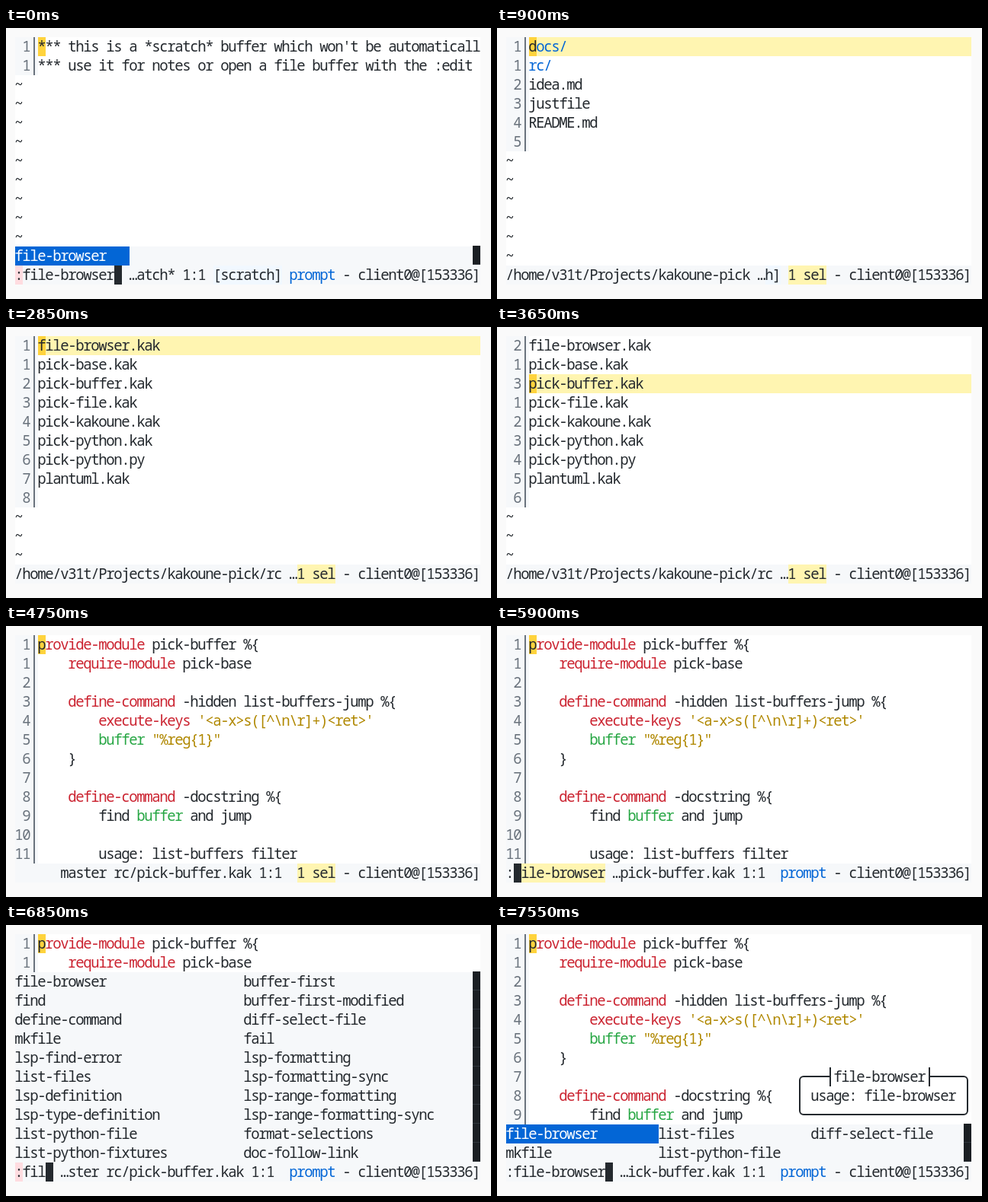
An HTML page that plays this animation: 636 px wide and 356 px high, repeating every 8000 ms.

```html
<!DOCTYPE html>
<html lang="en">
<head>
<meta charset="utf-8">
<title>Terminal file browser</title>
<style>
  html, body { margin: 0; width: 100%; height: 100%; overflow: hidden; background: #fafafa; }
  #screen {
    position: absolute; left: 12px; top: 12px; width: 610px; height: 325px;
    background: #fff; color: #24292e;
    font: 500 19px/25px "Noto Sans Mono", "DejaVu Sans Mono", monospace;
    font-stretch: 75%; font-variant-ligatures: none;
    letter-spacing: calc(10px - .6em);
  }
  #screen span {
    position: absolute; height: 25px; white-space: pre; text-indent: calc(5px - .3em);
  }
  #screen i { position: absolute; box-sizing: border-box; }
  .bar { background: #f6f8fa; }
  .gutter { background: #f6f8fa; color: #6a737d; }
  .line { background: #fff5b1; }
  .lineDir { background: #fff5b1; color: #0366d6; }
  .cursor { background: #ffd33d; }
  .dir { color: #0366d6; }
  .key { color: #cb2431; }
  .cmd { color: #28a745; }
  .str { color: #b08800; }
  .mode { background: #f6f8fa; color: #0366d6; }
  .sel { background: #fff5b1; }
  .note { background: #f1f8ff; }
  .bad { background: #ffdce0; }
  .block { background: #24292e; }
  .pick { background: #0366d6; color: #fff; }
  .thumb { background: #1b1f23; box-shadow: inset 0 -1px #2f363d; transform: translateY(-1px); }
  .track { background: #bfc1c4; }
  .rule { width: 2px; background: #6a737d; }
  .frame { border: 2px solid #24292e; border-radius: 6px; }
  .title { border: solid #24292e; border-width: 0 2px; background: #fff; }
</style>
</head>
<body>
<div id="screen"></div>
<script>
const COLS = 61, ROWS = 13, CW = 10, CH = 25, LOOP = 8000;
const screen = document.getElementById('screen');
let cells, shapes;

function put(row, col, text, cls = '') {
  [...text].forEach((ch, i) => {
    if (col + i < COLS) cells[row][col + i] = [ch, cls];
  });
}

function shape(cls, x, y, w, h) {
  shapes.push(`<i class="${cls}" style="left:${x}px;top:${y}px;width:${w}px;height:${h}px"></i>`);
}

const escapeHtml = s => s.replace(/&/g, '&amp;').replace(/</g, '&lt;');

function runs(row, y) {
  let html = '';
  for (let start = 0; start < COLS;) {
    const cls = row[start][1];
    let end = start, text = '';
    while (end < COLS && row[end][1] === cls) text += row[end++][0];
    if (cls || text.trim()) {
      html += `<span class="${cls}" style="left:${start * CW}px;top:${y * CH}px;` +
        `width:${(end - start) * CW}px">${escapeHtml(text)}</span>`;
    }
    start = end;
  }
  return html;
}

// Text window: relative line numbers, cursor on the first column.
function buffer(lines, current, paint) {
  for (let row = 0; row < ROWS - 1; row++) {
    if (row >= lines.length) { put(row, 0, '~'); continue; }
    const number = row === current ? row + 1 : Math.abs(row - current);
    put(row, 0, String(number).padStart(2) + ' ', 'gutter');
    paint(row, lines[row], row === current);
    if (row === current) put(row, 3, lines[row][0] || ' ', 'cursor');
  }
  shape('rule', 24, 0, 2, Math.min(lines.length, ROWS - 1) * CH);
}

const scratch = [
  "*** this is a *scratch* buffer which won't be automatically",
  '*** use it for notes or open a file buffer with the :edit '
];
const rootFiles = ['docs/', 'rc/', 'idea.md', 'justfile', 'README.md', ''];
const rcFiles = ['file-browser.kak', 'pick-base.kak', 'pick-buffer.kak', 'pick-file.kak',
  'pick-kakoune.kak', 'pick-python.kak', 'pick-python.py', 'plantuml.kak', ''];
const source = String.raw`provide-module pick-buffer %{
    require-module pick-base

    define-command -hidden list-buffers-jump %{
        execute-keys '<a-x>s([^\n\r]+)<ret>'
        buffer "%reg{1}"
    }

    define-command -docstring %{
        find buffer and jump

        usage: list-buffers filter`.split('\n');

const token = /(provide-module|require-module|define-command|execute-keys)|((?<![\w-])buffer(?![\w-]))|('[^']*'|"[^"]*")/g;

function paintCode(row, text) {
  put(row, 3, text);
  for (const m of text.matchAll(token)) {
    put(row, 3 + m.index, m[0], m[1] ? 'key' : m[2] ? 'cmd' : 'str');
  }
}

function paintEntry(row, text, active) {
  const isDir = text.endsWith('/');
  if (active) put(row, 3, ' '.repeat(COLS - 3), 'line');
  put(row, 3, text, active ? (isDir ? 'lineDir' : 'line') : (isDir ? 'dir' : ''));
}

const showScratch = () => buffer(scratch, 0, (row, text) => put(row, 3, text));
const showCode = () => buffer(source, 0, paintCode);

// Right-aligned status, cut on the left with an ellipsis when short of room.
function status(parts, from) {
  const full = parts.flatMap(([text, cls]) => [...text].map(ch => [ch, cls]));
  const room = COLS - from;
  const shown = full.length > room ? [['…', 'bar'], ...full.slice(1 - room)] : full;
  shown.forEach(([ch, cls], i) => put(ROWS - 1, COLS - shown.length + i, ch, cls));
}

const client = [' - client0@[153336]', 'bar'];
const normal = ['1 sel', 'sel'], prompting = ['prompt', 'mode'];
const scratchInfo = [['*scratch* 1:1 ', 'bar'], ['[scratch]', 'note'], [' ', 'bar']];
const codeInfo = [['master rc/pick-buffer.kak 1:1  ', 'bar']];

function bottom(text, info, mode) {
  put(ROWS - 1, 0, ' '.repeat(COLS), 'bar');
  put(ROWS - 1, 0, text, 'bar');
  status([...info, mode, client], text ? text.length + 1 : 0);
}

function prompt(typed, info, bad, hint = '') {
  const width = Math.max(typed.length + 1, hint.length);
  bottom(':' + ' '.repeat(width), info, prompting);
  put(ROWS - 1, 0, ':', bad ? 'bad' : 'bar');
  put(ROWS - 1, 1, typed, 'bar');
  if (hint) put(ROWS - 1, 1, hint, 'sel');
  put(ROWS - 1, 1 + typed.length, ' ', 'block');
}

function menu(items, picked = false, thumb = 10) {
  const longest = Math.max(...items.map(s => s.length));
  const columns = Math.floor((COLS - 1) / (longest + 1));
  const width = Math.floor((COLS - 1) / columns);
  const height = Math.min(10, Math.ceil(items.length / columns));
  const top = ROWS - 1 - height;
  for (let r = 0; r < height; r++) {
    put(top + r, 0, ' '.repeat(COLS - 1), 'bar');
    put(top + r, COLS - 1, ' ', r < thumb ? 'thumb' : 'track');
  }
  shapes = shapes.map(s => s.includes('rule') ? s.replace(/height:\d+/, h =>
    'height:' + Math.min(+h.slice(7), top * CH)) : s);
  items.forEach((item, i) => {
    const first = picked && i === 0;
    put(top + i % height, Math.floor(i / height) * width,
      first ? item.padEnd(width) : item, first ? 'pick' : 'bar');
  });
}

function infoBox(top) {
  for (let r = 0; r < 3; r++) put(top + r, 38, ' '.repeat(23));
  put(top, 43, 'file-browser', 'titleText');
  put(top + 1, 40, 'usage: file-browser');
  const y = top * CH;
  shape('frame', 384, y + 11, 222, 52);
  shape('title', 424, y, 132, CH);
}

const all = ['add-highlighter', 'alias', 'arrange-buffers', 'buffer', 'buffer-next',
  'buffer-previous', 'catch', 'change-directory', 'colorscheme', 'debug', 'declare-option',
  'declare-user-mode', 'define-command', 'delete-buffer', 'echo', 'edit', 'evaluate-commands',
  'execute-keys', 'fail', 'lsp-range-formatting-sync'];
const withF = ['file-browser', 'find', 'fail', 'format', 'format-buffer', 'format-selections',
  'define-command', 'mkfile', 'lsp-find-error', 'list-files', 'buffer', 'buffer-first',
  'buffer-first-modified', 'buffer-next', 'buffer-previous', 'delete-buffer',
  'diff-select-file', 'lsp-formatting', 'lsp-range-formatting-sync', 'doc-follow-link'];
const withFi = ['file-browser', 'find', 'define-command', 'mkfile', 'lsp-find-error',
  'list-files', 'lsp-definition', 'lsp-type-definition', 'list-python-file',
  'list-python-fixtures', 'buffer-first', 'buffer-first-modified', 'diff-select-file', 'fail',
  'lsp-formatting', 'lsp-formatting-sync', 'lsp-range-formatting',
  'lsp-range-formatting-sync', 'format-selections', 'doc-follow-link'];
const withFile = ['file-browser', 'mkfile', 'list-files', 'list-python-file', 'diff-select-file'];
const withFil = [...withFile, 'fail'];

const command = 'file-browser', root = '/home/v31t/Projects/kakoune-pick';

function browse(files, current, path) {
  buffer(files, current, paintEntry);
  bottom(path, scratchInfo, normal);
}

function launch(ready) {
  showScratch();
  menu([command], true);
  prompt(command, scratchInfo, !ready);
  if (ready) infoBox(8);
}

function type(text, items, thumb) {
  showCode();
  menu(items, false, thumb);
  prompt(text, codeInfo, true, text ? '' : command);
}

function complete(ready) {
  showCode();
  menu(withFile, true);
  prompt(command, codeInfo, !ready);
  if (ready) infoBox(7);
}

const steps = [
  [0, () => launch(false)],
  [50, () => launch(true)],
  [900, () => browse(rootFiles, 0, root)],
  [2200, () => browse(rootFiles, 1, root)],
  [2850, () => browse(rcFiles, 0, root + '/rc')],
  [3400, () => browse(rcFiles, 1, root + '/rc')],
  [3650, () => browse(rcFiles, 2, root + '/rc')],
  [4750, () => { showCode(); bottom('', codeInfo, normal); }],
  [5900, () => { showCode(); prompt('', codeInfo, false, command); }],
  [5950, () => type('', all, 1)],
  [6200, () => type('f', all, 1)],
  [6250, () => type('f', withF, 4)],
  [6450, () => type('fi', withF, 4)],
  [6500, () => type('fi', withFi)],
  [6850, () => type('fil', withFi)],
  [6900, () => type('fil', withFil)],
  [7050, () => type('file', withFil)],
  [7100, () => type('file', withFile)],
  [7500, () => complete(false)],
  [7550, () => complete(true)]
];

function compose(draw) {
  cells = Array.from({ length: ROWS }, () => Array.from({ length: COLS }, () => [' ', '']));
  shapes = [];
  draw();
  // Shapes sit above the cells, except that a box title stays on top.
  const text = cells.map(runs).join('');
  const title = text.match(/<span class="titleText".*?<\/span>/);
  return text + shapes.join('') + (title ? title[0] : '');
}

const scenes = steps.map(([, draw]) => compose(draw));
const started = performance.now();
let shown = -1;

function tick() {
  const time = (performance.now() - started) % LOOP;
  const index = steps.findLastIndex(([at]) => at <= time);
  if (index !== shown) screen.innerHTML = scenes[shown = index];
  requestAnimationFrame(tick);
}
tick();
</script>
</body>
</html>
```
